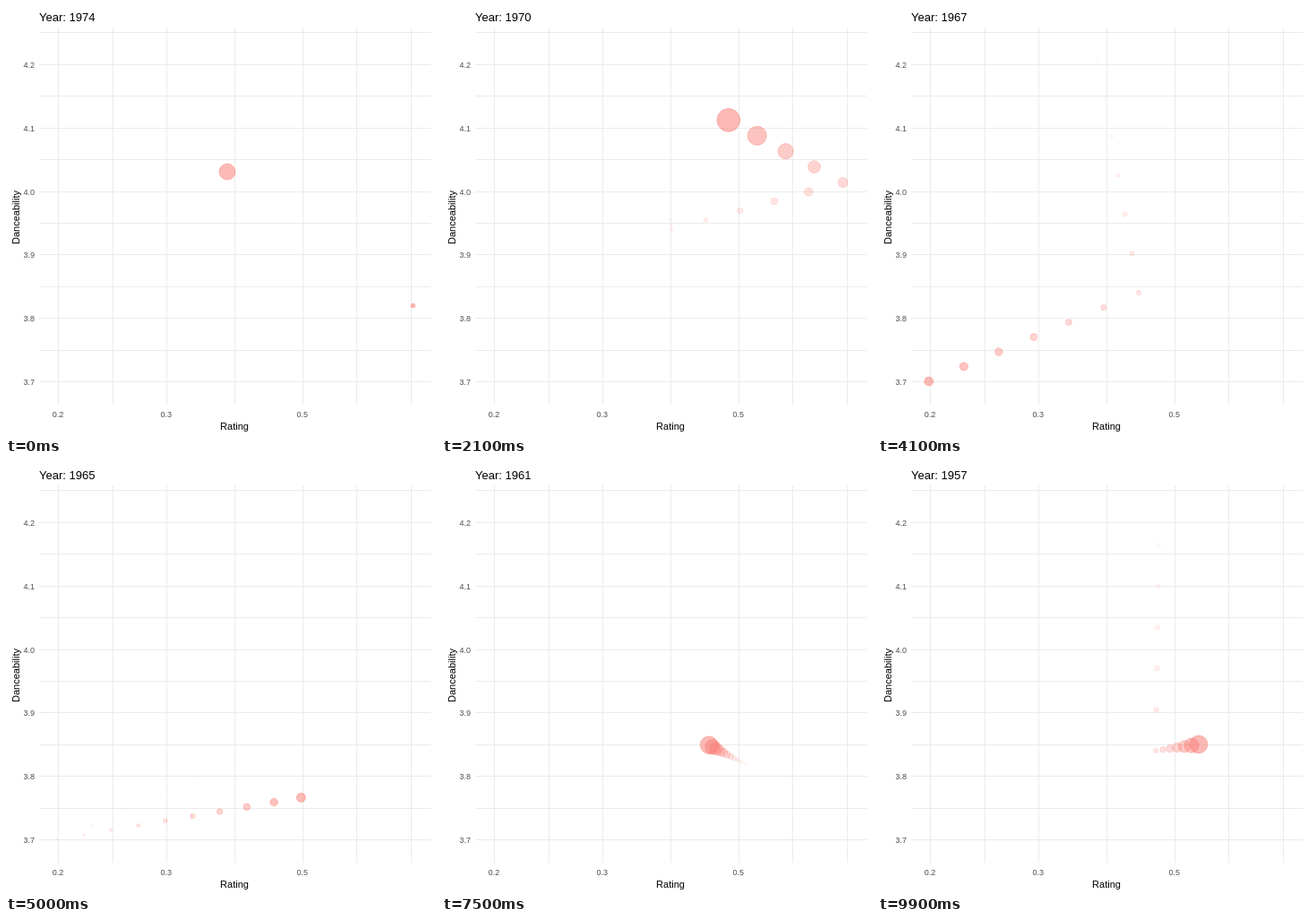
An HTML page with a canvas that plays this animation: 480 px wide and 480 px high, repeating every 10000 ms.

```html
<!DOCTYPE html>
<html lang="en">
<head>
<meta charset="utf-8">
<title>Danceability by rating</title>
<style>
  html, body { margin: 0; width: 100%; height: 100%; overflow: hidden; background: #fff; }
  canvas { display: block; width: 480px; height: 480px; }
</style>
</head>
<body>
<canvas id="stage" width="480" height="480"></canvas>
<script>
const ctx = document.getElementById('stage').getContext('2d');
const FRAMES = 100, STEP = 100, WAKE = 20;
const FIRST = 1974, LAST = 1957;
const GREY = '#4d4d4d', PANEL = [37, 24, 437, 421];

const frameOf = year => Math.round((FIRST - year) / (FIRST - LAST) * (FRAMES - 1));
const key = (year, x, y, r) => ({ n: frameOf(year), x, y, r });

// The bubble moves evenly from one key year to the next
const path = [
  key(1974, 247, 185, 8.8), key(1972, 256.4, 249.3, 10.2), key(1971, 447.5, 197, 10),
  key(1970, 256, 92.5, 14), key(1969, 245.4, 58, 16), key(1968, 291, 320, 7),
  key(1967, 56.8, 419, 4.7), key(1965, 390, 362, 4.8), key(1960, 270, 299, 11),
  key(1959, 314.4, 44.5, 21), key(1958, 310, 320, 6.5), key(1957, 358, 313, 9.7)
];

// Second bubbles join the main one at its next key
const joining = [key(1969, 300.3, 334.5, 6), key(1959, 221, 405, 6.7)];
const resting = key(1974, 454.3, 334.5, 2.1);

const nextKey = n => path.find(p => p.n > n);

function between(a, b, n) {
  const k = (n - a.n) / (b.n - a.n);
  const mix = p => a[p] + (b[p] - a[p]) * k;
  return { x: mix('x'), y: mix('y'), r: mix('r') };
}

function mainAt(n) {
  const i = Math.max(1, path.findIndex(p => p.n >= n));
  return between(path[i - 1], path[i], n);
}

function bubble({ x, y, r }, fade = 1) {
  ctx.beginPath();
  ctx.arc(x, y, r * fade + 0.2, 0, Math.PI * 2);
  ctx.fillStyle = ctx.strokeStyle = `rgba(248,118,109,${0.5 * Math.sqrt(fade)})`;
  ctx.lineWidth = 0.9;
  ctx.globalAlpha = Math.sqrt(fade);
  ctx.fill();
  ctx.stroke();
  ctx.globalAlpha = 1;
}

function label(text, x, y, size, color, align = 'left') {
  ctx.font = `${size}px "Liberation Sans", Arial, sans-serif`;
  ctx.fillStyle = color;
  ctx.textAlign = align;
  ctx.fillText(text, x, y);
}

// Logarithmic rating axis
const ratingX = v => 58.7 + 297.6 * Math.log(v / 0.2);

function drawAxes() {
  const [left, top, width, height] = PANEL;
  const column = v => {
    ctx.fillStyle = '#ebebeb';
    ctx.fillRect(Math.floor(ratingX(v)), top, 1, height);
  };
  [0.2, 0.3, 0.5, 0.75].forEach((v, i, all) => {
    column(v);
    if (i) column(Math.sqrt(v * all[i - 1]));
    if (i < 3) label(v.toFixed(1), ratingX(v) - 0.7, 459, 9, GREY, 'center');
  });

  for (let i = 0; i < 12; i++) {
    const y = Math.round(29.3 + i * 35.45);
    ctx.fillStyle = '#ebebeb';
    ctx.fillRect(left, y, width, 1);
    if (i % 2) label((4.25 - i / 20).toFixed(1), 32, y + 4, 9, GREY, 'right');
  }

  label('Rating', 255, 473, 11, '#000', 'center');
  ctx.save();
  ctx.translate(15, 236);
  ctx.rotate(-Math.PI / 2);
  label('Danceability', 0, 0, 11, '#000', 'center');
  ctx.restore();
}

// Past positions shrink and fade with a cubic falloff
function drawWake(n) {
  const first = Math.max(0, n - WAKE);
  for (let j = first; j < n; j++) {
    bubble(mainAt(j), ((j - first + 1) / (WAKE + 1)) ** 3);
  }
}

function draw(n) {
  ctx.fillStyle = '#fff';
  ctx.fillRect(0, 0, 480, 480);
  drawAxes();
  const year = Math.round(FIRST - n * (FIRST - LAST) / (FRAMES - 1));
  label('Year: ' + year, 37, 17, 13, '#000');

  ctx.save();
  ctx.beginPath();
  ctx.rect(...PANEL);
  ctx.clip();
  drawWake(n);
  if (n < nextKey(0).n) bubble(resting);
  for (const p of joining) {
    const end = nextKey(p.n);
    if (n >= p.n && n < end.n) bubble(between(p, end, n));
  }
  bubble(mainAt(n));
  ctx.restore();
}

const start = performance.now();
function tick() {
  const t = Math.max(0, performance.now() - start);
  draw(Math.floor(t / STEP) % FRAMES);
  requestAnimationFrame(tick);
}
tick();
</script>
</body>
</html>
```
